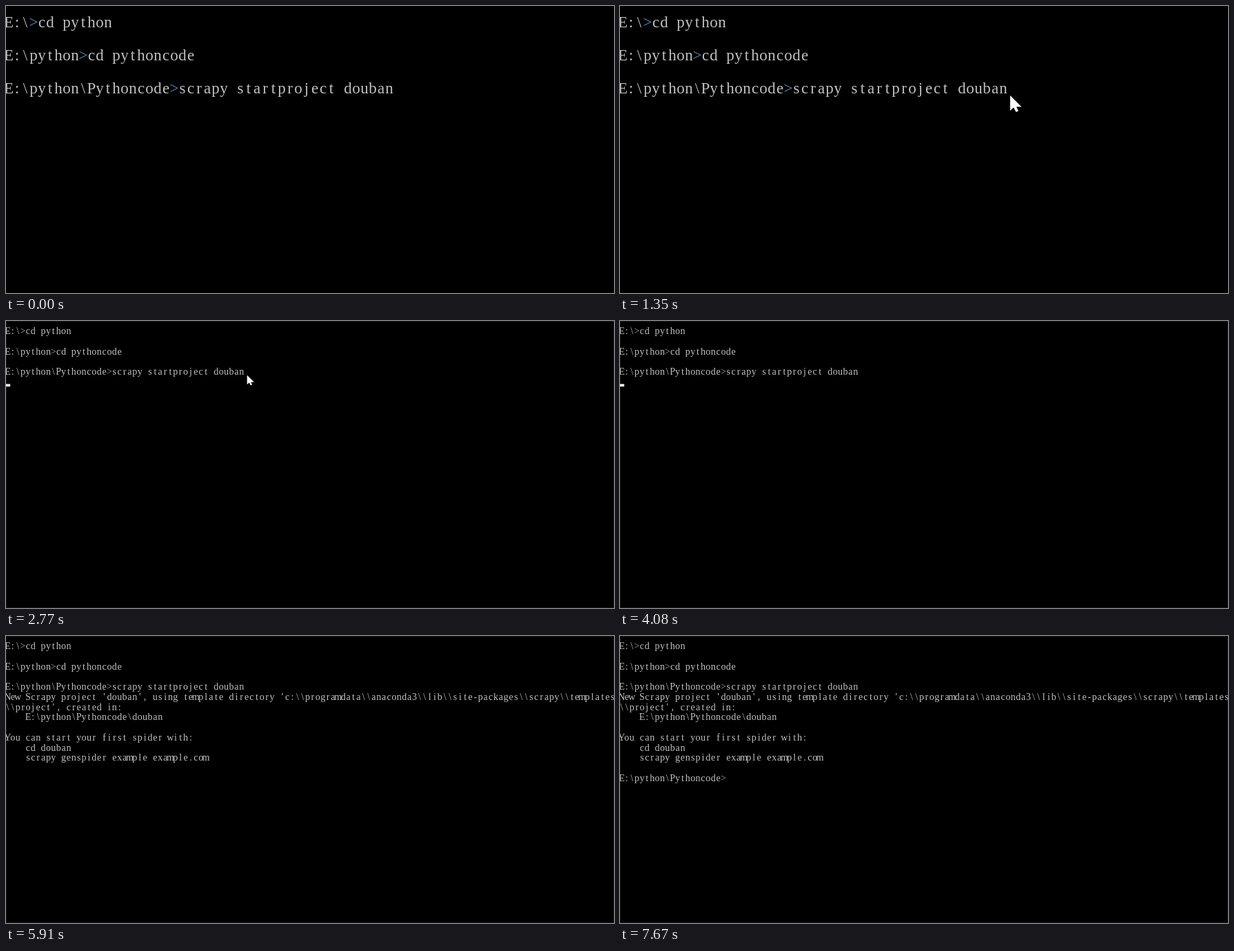
Recreate the animation shown at these times as an HTML page with a canvas. Size 882 by 417 pixels, loop 8120 ms.

```html
<!DOCTYPE html>
<html lang="en">
<head>
<meta charset="utf-8">
<title>Terminal</title>
<style>
  html, body { margin: 0; width: 100%; height: 100%; overflow: hidden; background: #000; }
  canvas { display: block; }
</style>
</head>
<body>
<canvas id="stage" width="882" height="417"></canvas>
<script>
const ctx = document.getElementById('stage').getContext('2d', { alpha: false });
const LOOP = 8120, ENTER = 2240, ZOOM_OUT = 2340, OUTPUT = 5910, PROMPT = 6030;
const SMALL = 0.6146;
const CELL = 12, ROW = 24, LEFT = -2, BASELINE = 31;
const TICK = 107; // pointer positions are refreshed at this interval

const commands = [
  'E:\\>cd python',
  '',
  'E:\\python>cd pythoncode',
  '',
  'E:\\python\\Pythoncode>scrapy startproject douban'
];
const output = [
  String.raw`New Scrapy project 'douban', using template directory 'c:\\programdata\\anaconda3\\lib\\site-packages\\scrapy\\templates`,
  String.raw`\\project', created in:`,
  String.raw`    E:\python\Pythoncode\douban`,
  '',
  'You can start your first spider with:',
  '    cd douban',
  '    scrapy genspider example example.com'
];
const prompt = 'E:\\python\\Pythoncode>';

const home = { x: 575, y: 100 };
const glides = [
  { start: 260, ticks: 4, to: { x: 566, y: 130 }, bend: { x: 547, y: 45 } },
  { start: 1360, ticks: 2, to: { x: 557, y: 121 } },
  { start: 1690, ticks: 2, to: { x: 558, y: 122 } },
  { start: 2550, ticks: 3, to: { x: 569, y: 128 } },
  { start: 3220, ticks: 1, to: { x: 610, y: 156 } }
];
const blinks = [
  { from: ENTER, until: 3220, period: 530, on: 380 },
  { from: 4080, until: 5590, period: 860, on: 590 },
  { from: PROMPT, until: LOOP, period: 1090, on: 545 }
];

const within = (t, from, until) => t >= from && t < until;

function pointerAt(t) {
  let from = home;
  for (const { start, ticks, to, bend } of glides) {
    if (t < start) break;
    const p = Math.min(1, (Math.floor((t - start) / TICK) + 1) / ticks);
    const along = axis => {
      const middle = bend ? bend[axis] : (from[axis] + to[axis]) / 2;
      return (1 - p) ** 2 * from[axis] + 2 * p * (1 - p) * middle + p * p * to[axis];
    };
    const position = { x: Math.round(along('x')), y: Math.round(along('y')) };
    if (p < 1) return position;
    from = to;
  }
  return from;
}

function drawLine(text, row, chevronColor) {
  [...text].forEach((char, column) => {
    ctx.fillStyle = char === '>' ? chevronColor : '#c0c0c0';
    ctx.fillText(char, LEFT + (column + 0.5) * CELL, BASELINE + row * ROW);
  });
}

function drawCaret(column, row) {
  ctx.fillStyle = '#fff';
  ctx.fillRect(LEFT + column * CELL, 29 + row * ROW, CELL, 6);
}

function drawPointer({ x, y }) {
  ctx.save();
  ctx.translate(x, y);
  const arrow = new Path2D('M0 0V22L5 17.5 8.5 24 12 22.5 9 16.5H16.5Z');
  ctx.strokeStyle = '#000';
  ctx.lineWidth = 1.5;
  ctx.stroke(arrow);
  ctx.fillStyle = '#fff';
  ctx.fill(arrow);
  ctx.restore();
}

function draw(t) {
  const small = t >= ZOOM_OUT;
  const scale = small ? SMALL : 1;
  const chevronColor = small ? '#a0a0a0' : '#5690bc';

  ctx.setTransform(1, 0, 0, 1, 0, 0);
  ctx.fillStyle = '#000';
  ctx.fillRect(0, 0, 882, 417);
  if (small) {
    ctx.strokeStyle = '#161616';
    ctx.lineWidth = 1;
    ctx.strokeRect(0.5, 0.5, 881, 416);
  }

  ctx.scale(scale, scale);
  ctx.font = '23px "Liberation Serif", serif';
  ctx.textAlign = 'center';
  commands.forEach((text, i) => drawLine(text, i, chevronColor));
  if (t >= OUTPUT) output.forEach((text, i) => drawLine(text, i + 5, chevronColor));
  if (t >= PROMPT) drawLine(prompt, 13, chevronColor);

  const blink = blinks.find(({ from, until }) => within(t, from, until));
  if (blink && (t - blink.from) % blink.period < blink.on) {
    if (t < PROMPT) drawCaret(0, 5);
    else drawCaret(prompt.length, 13);
  }
  if (within(t, 100, 1030) || within(t, 1250, 3320)) drawPointer(pointerAt(t));
}

const start = performance.now();
function frame() {
  draw((performance.now() - start) % LOOP);
  requestAnimationFrame(frame);
}
frame();
</script>
</body>
</html>
```
